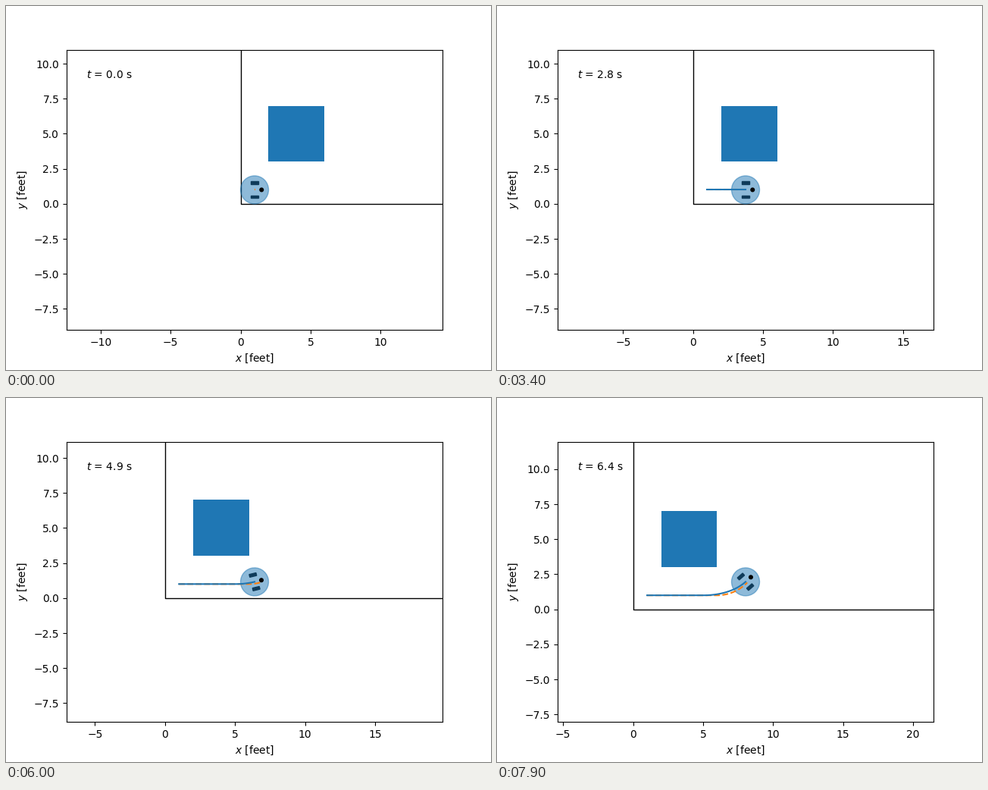
Write a matplotlib script that moves like this. It is 640x480 px and loops after 8 s.

```python
import numpy as np
import matplotlib.pyplot as plt
from matplotlib.animation import FuncAnimation
from matplotlib.patches import Circle, Rectangle
from matplotlib.transforms import Affine2D

FRAMES, STEP, SUB = 80, 0.081, 20
JUMP = 50 * STEP          # the plan switches to the arc here
RADIUS = 3.0


def plan(t):
    """Straight line, then an arc around (6, 4): x, y, heading, turn rate."""
    if t < JUMP - 1e-9:
        return 1 + t, 1.0, 0.0, 0.0
    a = (t - 4) / RADIUS
    return 6 + RADIUS * np.sin(a), 4 - RADIUS * np.cos(a), a, 1 / RADIUS


def simulate():
    """Unicycle robot that follows the plan with linear feedback."""
    pose = np.array([1.0, 1.0, 0.0])
    poses = [pose.copy()]
    h = STEP / SUB
    for i in range((FRAMES - 1) * SUB):
        px, py, pa, pw = plan(i * h)
        x, y, a = pose
        c, s = np.cos(a), np.sin(a)
        along = c * (px - x) + s * (py - y)
        across = -s * (px - x) + c * (py - y)
        v = 1 + along
        w = pw + across + np.sqrt(3) * (pa - a)
        pose += h * np.array([v * c, v * s, w])
        if (i + 1) % SUB == 0:
            poses.append(pose.copy())
    return np.array(poses)


path = simulate()
planned = np.array([plan(k * STEP)[:2] for k in range(FRAMES)])

fig, ax = plt.subplots(figsize=(6.4, 4.8), dpi=100)
ax.set_xlabel("$x$ [feet]")
ax.set_ylabel("$y$ [feet]")
HALF_H = 10
HALF_W = HALF_H * 496 / 369.6

ax.add_patch(Rectangle((2, 3), 4, 4, color="C0", lw=0))
ax.plot([0, 0, 60], [60, 0, 0], color="black", lw=1, zorder=1)

robot = [
    Rectangle((-0.25, 0.4), 0.5, 0.2, color="black"),
    Rectangle((-0.25, -0.6), 0.5, 0.2, color="black"),
    Circle((0, 0), 1, color="C0", alpha=0.5),
    Circle((0.5, 0), 0.125, color="black"),
]
for part in robot:
    ax.add_patch(part)

plan_line, = ax.plot([], [], "--", color="C1", zorder=2)
trail, = ax.plot([], [], color="C0", zorder=2.1)
clock = ax.text(0, 0, "")


def draw(k):
    x, y, a = path[k]
    ax.set_xlim(x - HALF_W, x + HALF_W)
    ax.set_ylim(y - HALF_H, y + HALF_H)
    place = Affine2D().rotate(a).translate(x, y) + ax.transData
    for part in robot:
        part.set_transform(place)
    if k:
        plan_line.set_data(planned[:k + 1, 0], planned[:k + 1, 1])
    else:
        plan_line.set_data([1, 1.06], [1, 1])   # only a dot at the start
    trail.set_data(path[:k + 1, 0], path[:k + 1, 1])
    clock.set_position((x - 12, y + 8))
    clock.set_text(f"$t$ = {k * STEP:.1f} s")
    return [plan_line, trail, clock, *robot]


anim = FuncAnimation(fig, draw, frames=FRAMES, interval=100,
                     init_func=lambda: draw(0), repeat=True, repeat_delay=0)
plt.show()
```
